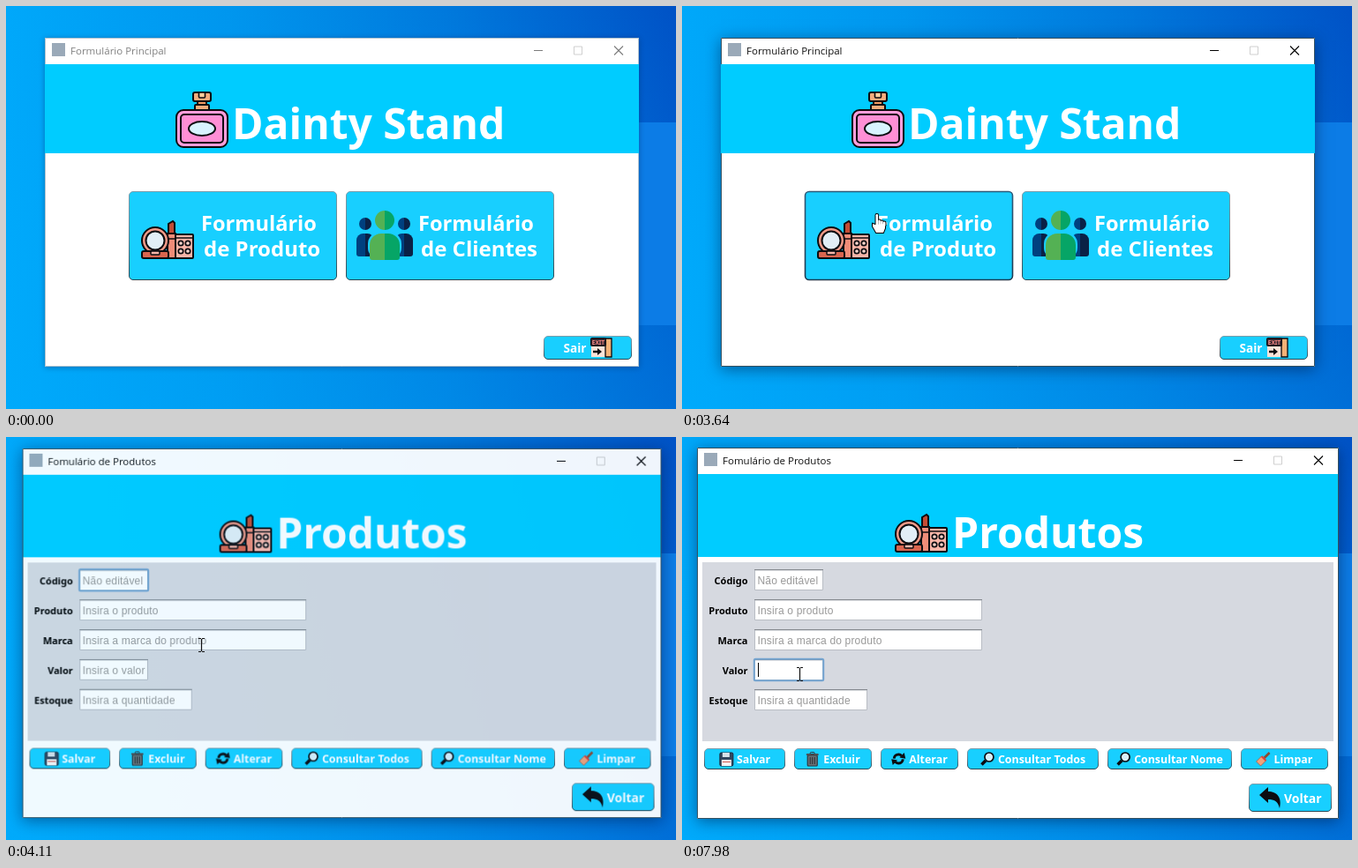
An HTML page with a canvas for the animation above (8000 ms loop, 759 by 457 pixels).

```html
<!DOCTYPE html>
<html lang="pt">
<head>
<meta charset="utf-8">
<title>Formulário</title>
<style>
html, body { margin: 0; width: 100%; height: 100%; overflow: hidden; background: #0090ec; }
canvas { display: block; }
</style>
</head>
<body>
<canvas id="stage" width="759" height="457"></canvas>
<script>
const W = 759, H = 457, LOOP = 8000;
const stage = document.getElementById('stage').getContext('2d');
const sheet = document.createElement('canvas');
sheet.width = W;
sheet.height = H;
const layer = sheet.getContext('2d');
let g = stage;

const BOLD = '"Noto Sans", "Open Sans", sans-serif';
const PLAIN = '"Liberation Sans", Arial, sans-serif';
const TITLE = '"Open Sans", "Noto Sans", sans-serif';
const INK = '#0c0c10', AQUA = '#00ccff', SKY = '#18cfff';
const NAVY = ['#00407f', '#0a2146'], GREEN = ['#54b154', '#06a566'];

// ---------- drawing helpers ----------
function paint(fill, stroke, width = 1) {
  if (fill) { g.fillStyle = fill; g.fill(); }
  if (stroke) { g.strokeStyle = stroke; g.lineWidth = width; g.stroke(); }
}
function box(x, y, w, h, r, fill, stroke, width) {
  g.beginPath();
  g.roundRect(x, y, w, h, r);
  paint(fill, stroke, width);
}
function oval(x, y, rx, ry, fill, stroke, width) {
  g.beginPath();
  g.ellipse(x, y, rx, ry, 0, 0, Math.PI * 2);
  paint(fill, stroke, width);
}
function poly(p, fill, stroke, width, open) {
  g.beginPath();
  for (let i = 0; i < p.length; i += 2) g.lineTo(p[i], p[i + 1]);
  if (!open) g.closePath();
  paint(fill, stroke, width);
}
function line(x0, y0, x1, y1, stroke, width = 1) {
  poly([x0, y0, x1, y1], null, stroke, width, true);
}
function text(s, x, y, font, color, align = 'left', spacing = 0) {
  g.font = font;
  g.fillStyle = color;
  g.textAlign = align;
  g.letterSpacing = spacing + 'px';
  g.fillText(s, x, y);
}
function bold(s, x, y, size, color = '#fff', align) {
  text(s, x, y, `bold ${size}px ${BOLD}`, color, align);
}
function ramp(x, y, ...colors) {
  const r = g.createLinearGradient(...x, ...y);
  colors.forEach((c, i) => r.addColorStop(i / (colors.length - 1), c));
  return r;
}
function at(x, y, draw) {
  g.save();
  g.translate(x, y);
  draw();
  g.restore();
}

// ---------- icons ----------
function perfume() {
  box(20, 1, 20, 10, 2, '#f5ad7c', INK, 2);
  box(26.5, 1, 7, 6, 1, '#ffcf9d', INK, 1.6);
  box(25, 11, 10, 4, 0, '#f39a63', INK, 2);
  box(22, 15, 16, 6, 1, '#f5ad7c', INK, 2);
  box(1, 21, 58, 42, 8, '#ff9edb', INK, 2);
  box(6, 26, 48, 32, 4, '#ff8fd5', INK, 2);
  oval(30, 42, 15, 8, '#d8f3ff', INK, 2);
}
function makeup() {
  box(39, 16, 20, 27, 1, '#f9b5a8', INK, 2);
  line(39, 20, 59, 20, INK, 1.5);
  for (const x of [45, 53]) for (const y of [26, 35]) oval(x, y, 2.7, 2.7, '#fbd5cc', INK, 1.7);
  poly([31, 4, 36, 1, 38, 3, 38, 16, 31, 16], '#c24c35', INK, 2);
  box(30, 15, 9, 28, 0, '#f08c78', INK, 2);
  line(30, 21, 39, 21, INK, 1.5);
  oval(16, 23, 15, 15, '#f29a88', INK, 2);
  oval(16, 23, 10.5, 10.5, '#e2eef6', INK, 2);
  box(1, 35, 30, 8, 2, '#d9654f', INK, 2);
  box(11, 35, 10, 4, 1, '#f9b5a8', INK, 1.5);
}
// head and shoulders, split into a light and a dark half
function person(x, y, r, w, h, tones) {
  const fill = ramp([x - .1, 0], [x + .1, 0], ...tones);
  oval(x, y, r, r, fill);
  box(x - w / 2, y + r + 4, w, h, [w * .38, w * .38, 3, 3], fill);
}
function people() {
  for (const x of [10, 54]) person(x, 15, 7, 20, 26, NAVY);
  box(13, 24, 38, 32, 14, SKY);
  person(32, 11, 11, 34, 30, GREEN);
}
function exitDoor() {
  box(1, 10, 18, 13, 0, '#fbe3d8');
  box(17, 2, 7, 21, 0, '#f4b277', INK, 1.3);
  box(.5, 1.5, 17, 9, 1, '#30232c', INK);
  bold('EXIT', 9, 8.6, 6.5, '#ff8c87', 'center');
  line(3, 17, 10, 17, INK, 2.5);
  poly([8, 13, 13, 17, 8, 21], INK);
}
function floppy() {
  box(1, 1, 15, 15, 1.5, '#33475f', '#1c2838');
  box(4, 1, 8, 5, 0, '#d7e1e8');
  box(3, 9, 11, 7, 0, '#f5f5f5');
  line(4, 11.5, 13, 11.5, '#d55b50');
}
function trash() {
  box(2, 4, 11, 12, 1, '#6b7176', '#30353a', 1.2);
  box(.5, 2, 14, 2.2, 1, '#4b5156');
  box(5, .5, 5, 2, 1, null, '#30353a');
  for (const x of [5, 7.5, 10]) line(x, 6, x, 14, '#252a2e');
}
function refresh() {
  for (const a of [0, Math.PI]) at(8, 8, () => {
    g.rotate(a);
    g.beginPath();
    g.arc(0, 0, 5, Math.PI * 1.02, Math.PI * 1.75);
    paint(null, INK, 3);
    poly([1.2, -1.5, 8, -.3, 6.5, -7], INK);
  });
}
function lens() {
  line(1.5, 14.5, 6, 10, INK, 3.5);
  oval(10, 6, 5, 5, '#d9f0fa', INK, 1.7);
}
function broom() {
  line(9, 7, 15, 1, '#8d4b32', 2.6);
  poly([6, 5, 11, 10, 5, 16, 0, 11], '#f2a27a', '#a35a44', .8);
  line(6, 5, 11, 10, '#d8443c', 2);
}
function backArrow() {
  g.beginPath();
  g.moveTo(0, 9);
  g.lineTo(10, 0);
  g.lineTo(10, 5);
  g.bezierCurveTo(20, 5, 26, 12, 23, 24);
  g.bezierCurveTo(21, 16, 17, 14, 10, 14);
  g.lineTo(10, 18);
  paint(INK);
}

// ---------- widgets ----------
function button([x, y, w, h], state) {
  const fill = { down: '#08b6e8', over: '#20d3ff' }[state] || SKY;
  const rim = state === 'focus' ? ['#2f5a78', '#1d3a50'] : ['#7c9dab', '#5c7f8d', '#274652'];
  box(x + .5, y + .5, w - 1, h - 1, 4.5, fill, ramp([0, y], [0, y + h], ...rim), state === 'focus' ? 1.6 : 1);
}
function frame(x, y, w, h, active, title) {
  g.save();
  g.shadowColor = `rgba(0,20,60,${active ? .5 : .35})`;
  g.shadowBlur = active ? 16 : 6;
  g.shadowOffsetY = active ? 3 : 1;
  box(x, y, w, h, 0, '#fff');
  g.restore();
  const tone = active ? '#000' : '#7c7c7c', cy = y + 14.5, r = x + w;
  box(x + 8, y + 6, 15, 15, 0, '#9aa9b8');
  text(title, x + 29, y + 19, `11.5px ${TITLE}`, active ? '#111' : '#808080');
  line(r - 119, cy, r - 109, cy, tone);
  box(r - 73.5, cy - 4.5, 9, 9, 0, null, '#cfcfcf');
  for (const d of [-5, 5]) line(r - 28, cy - d, r - 18, cy + d, tone, 1.1);
  box(x + .5, y + .5, w - 1, h - 1, 0, null, active ? '#34505f' : 'rgba(80,120,150,.45)');
}
// icon and label together in the middle of the button
function iconButton(x, w, label, icon) {
  button([x, 353, w, 24]);
  g.font = `bold 12.4px ${BOLD}`;
  g.letterSpacing = '0px';
  const left = x + (w - 20 - g.measureText(label).width) / 2;
  at(left, 357, icon);
  bold(label, left + 20, 370, 12.4);
}
function field(i, [label, , hint], focused, age) {
  const [x, y, w, h] = fieldBox(i);
  bold(label, 74.5, y + 17, 11, '#000', 'right');
  box(x + .5, y + .5, w - 1, h - 1, 0, '#fff', '#b9bdc4');
  line(x, y + .5, x + w, y + .5, '#85898f');
  line(x + 1, y + 1.5, x + w - 1, y + 1.5, '#dcdee2');
  if (focused) box(x - .25, y - .25, w + .5, h + .5, 1.5, null, '#73a4d1', 2);
  if (!focused || i === 0) text(hint, 85.5, y + 17, `12px ${PLAIN}`, '#999', 'left', .17);
  else if (age % 1000 < 500) box(86, y + 4, 1, 16, 0, '#000');
}

// ---------- windows ----------
const PRESS = 3480, SWAP = 3890, READY = 4190;
const MENU = [[139, 210, 236, 101], [385, 210, 236, 101], [609, 374, 100, 27]];
const FIELDS = [
  ['Código', 78, 'Não editável'],
  ['Produto', 258, 'Insira o produto'],
  ['Marca', 258, 'Insira a marca do produto'],
  ['Valor', 78, 'Insira o valor'],
  ['Estoque', 128, 'Insira a quantidade']
];
const ACTIONS = [
  [92, 'Salvar', floppy], [88, 'Excluir', trash], [88, 'Alterar', refresh],
  [149, 'Consultar Todos', lens], [141, 'Consultar Nome', lens], [99, 'Limpar', broom]
];
// click time and the field that takes the focus
const CLICKS = [[0, 0], [5120, 1], [5700, 2], [6490, 3], [7200, 4], [7910, 3]];
const fieldBox = i => [82, 150 + 34 * i, FIELDS[i][1], 24];
const inside = ([x, y, w, h], p) => p.x >= x && p.x < x + w && p.y >= y && p.y < y + h;

function mainWindow(t, p) {
  frame(44, 36, 673, 373, t >= PRESS && t < SWAP, 'Formulário Principal');
  box(44, 66, 673, 101, 0, AQUA);
  at(192, 97, perfume);
  bold('Dainty Stand', 256, 151, 48);
  MENU.forEach((b, i) => {
    let state = inside(b, p) ? 'over' : '';
    if (i === 0 && t >= PRESS) state = t < PRESS + 160 ? 'down' : 'focus';
    button(b, state);
  });
  at(153, 243, makeup);
  at(397, 232, people);
  ['de Produto', 'de Clientes'].forEach((label, i) => {
    bold('Formulário', 221 + 246 * i, 255, 23.6);
    bold(label, 224 + 246 * i, 284, 24);
  });
  bold('Sair', 631.5, 393, 13.6);
  at(662, 375, exitDoor);
}
function productWindow(t, filled) {
  frame(17, 12, 727, 421, true, 'Fomulário de Produtos');
  if (!filled) return;
  const [since, focus] = CLICKS.findLast(c => c[0] <= t);
  box(18, 42, 725, 94, 0, AQUA);
  at(241, 87, makeup);
  bold('Produtos', 306, 126, 48);
  box(23, 142, 715, 203, 0, '#d6d9e0');
  FIELDS.forEach((f, i) => field(i, f, focus === i, t - since));
  let x = 25;
  for (const [w, label, icon] of ACTIONS) {
    iconButton(x, w, label, icon);
    x += w + 10;
  }
  button([642, 393, 94, 32]);
  at(654, 397, backArrow);
  bold('Voltar', 682, 415, 14);
}
function desktop() {
  box(0, 0, W, H, 0, ramp([0, 0], [W, 0], '#00a8fa', '#0096ee', '#0078dc', '#0052c6'));
  box(0, 0, W, H, 0, ramp([0, 0], [0, H], 'rgba(0,175,255,0)', 'rgba(0,175,255,.3)'));
  box(547, 132, 230, 230, 0, '#0c7ce6');
}

// ---------- pointer ----------
// each move: start, end, and the place it ends at
const MOVES = [
  [330, 870, 267, 344], [1120, 1600, 292, 270], [1770, 2080, 478, 272], [2230, 2560, 649, 381],
  [2710, 3020, 344, 266], [3100, 3420, 221, 236], [4340, 5030, 127, 194], [5200, 5470, 131, 227],
  [6090, 6300, 147, 263], [6710, 7200, 150, 301], [7420, 7750, 133, 269]
];
function pointer(t) {
  let x = 585, y = 458;
  for (const [from, to, tx, ty] of MOVES) {
    const k = Math.min(1, Math.max(0, (t - from) / (to - from)));
    const e = k * k * (3 - 2 * k);
    x += (tx - x) * e;
    y += (ty - y) * e;
  }
  return { x: Math.round(x), y: Math.round(y) };
}
function arrow() {
  poly([0, 0, 0, 16, 3.7, 12.5, 6.3, 18.5, 8.8, 17.4, 6.2, 11.6, 11.5, 11.5], '#fff', '#000');
}
function hand() {
  for (const rim of ['#000', null]) {
    for (let i = 0; i < 4; i++) {
      const top = i ? 5.5 + i : 0;
      box(-1.5 + 2.8 * i, top, 2.6, 14 - top, 1.3, '#fff', rim, 2);
    }
    poly([-5, 11, -2, 12, 9, 11, 9, 16, 7, 21, -1, 21, -5, 14], '#fff', rim, 2);
  }
}
function beam() {
  line(.5, -7, .5, 7, '#111', 1.2);
  for (const y of [-7.5, 7.5]) for (const x of [-3, 1]) line(x, y, x + 3, y, '#111');
}
function drawPointer(t, p) {
  const over = t < SWAP ? MENU.some(b => inside(b, p)) : FIELDS.some((f, i) => inside(fieldBox(i), p));
  at(p.x, p.y, !over ? arrow : t < SWAP ? hand : beam);
}

// ---------- scene ----------
function show(draw, scale = 1, alpha = 1) {
  g = layer;
  g.clearRect(0, 0, W, H);
  draw();
  g = stage;
  at(380.5, 222.5, () => {
    g.globalAlpha = alpha;
    g.scale(scale, scale);
    g.drawImage(sheet, -380.5, -222.5);
  });
}
function scene(t) {
  const p = pointer(t), s = t - SWAP;
  desktop();
  if (s < 0) show(() => mainWindow(t, p));
  else if (t >= READY) show(() => productWindow(t, true));
  else {
    const k = (s + 40) / 340, left = 1 - s / 200;
    show(() => productWindow(t, s > 100), 1 - .078 * (1 - k) ** 2, Math.min(1, k * k * 1.6));
    if (left > 0) show(() => mainWindow(t, p), 1 - s / 4200, left);
  }
  drawPointer(t, p);
}
const start = performance.now();
function tick() {
  scene((performance.now() - start) % LOOP);
  requestAnimationFrame(tick);
}
tick();
</script>
</body>
</html>
```
